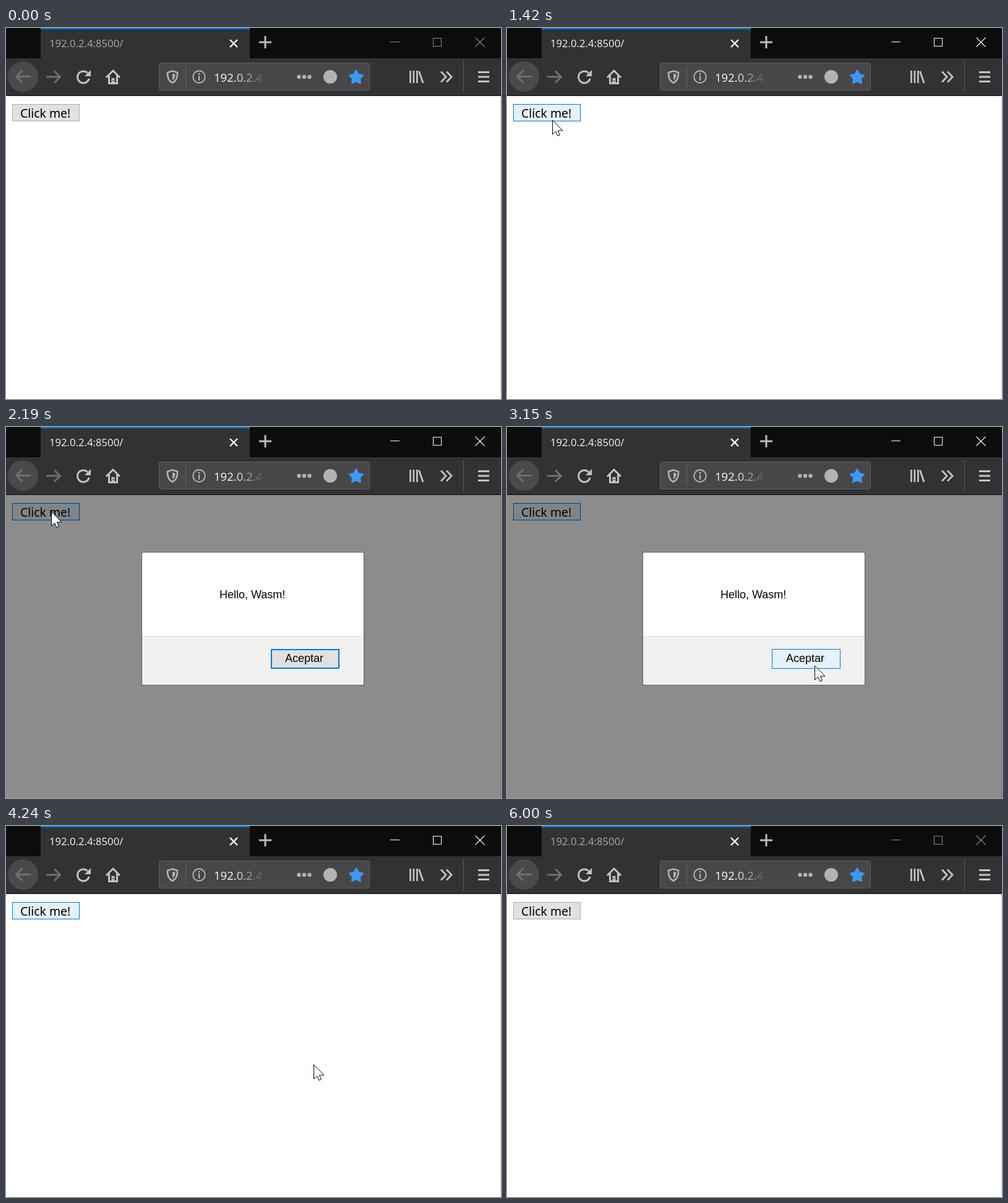
Animation, 800 px wide and 600 px high, one loop 6.07 s. Source, as an HTML page with a canvas:

```html
<!DOCTYPE html>
<html lang="en">
<head>
<meta charset="utf-8">
<title>Button demo</title>
<style>
  html, body { margin: 0; width: 100%; height: 100%; overflow: hidden; background: #fff; }
  canvas { display: block; width: 800px; height: 600px; }
</style>
</head>
<body>
<canvas id="stage" width="800" height="600"></canvas>
<script>
const ctx = document.getElementById('stage').getContext('2d');
const LOOP = 6070;
const ADDRESS = '192.0.2.4:8500/';
const UI_FONT = '"Open Sans", "Noto Sans", sans-serif';
const DIALOG_FONT = '18px "Liberation Sans", Arial, sans-serif';
const ICON = '#c4c4c5', FIELD_ICON = '#b3b3b5', FAINT = '#736d6b';

const easeOut = u => 1 - (1 - u) ** 2;
const easeIn = u => u ** 1.6;
const easeBoth = u => u * u * (3 - 2 * u);

// Pointer moves in discrete steps, the first one at `start`, the last at `end`.
const MOVES = [
  { start: 80, end: 560, steps: 11, from: [703, 668], to: [71, 193], ease: easeOut },
  { start: 1140, end: 1550, steps: 10, from: [71, 193], to: [73, 136], ease: easeBoth },
  { start: 2490, end: 3060, steps: 12, from: [73, 136], to: [483, 368], ease: easeBoth },
  { start: 3110, end: 3150, steps: 2, from: [483, 368], to: [497, 385], ease: u => u },
  { start: 4440, end: 4690, steps: 6, from: [497, 385], to: [507, 610], ease: easeIn }
];
const PRESSES = [[1000, 1140], [2090, 2190], [4150, 4240]];

const PAGE_BUTTON = { x: 10, y: 123, w: 109, h: 28 };
const OK_BUTTON = { x: 428, y: 359, w: 111, h: 32 };
const LOOKS = {
  normal: ['#e1e1e1', '#adadad', 1],
  focus: ['#e1e1e1', '#0078d7', 2],
  hover: ['#e5f1fb', '#0078d7', 1],
  press: ['#cce4f7', '#005499', 1]
};

const within = (t, [a, b]) => t >= a && t < b;
const inside = (p, r) => p && p[0] >= r.x && p[0] < r.x + r.w && p[1] >= r.y && p[1] < r.y + r.h;

function pointerAt(t) {
  const move = MOVES.filter(m => t >= m.start).pop();
  if (!move) return null;
  const { start, end, steps, from, to, ease } = move;
  const step = Math.min(steps, 1 + Math.floor((t - start) / (end - start) * (steps - 1) + 1e-6));
  const p = ease(step / steps);
  return from.map((v, i) => Math.round(v + (to[i] - v) * p));
}

function rect(x, y, w, h, fill) {
  ctx.fillStyle = fill;
  ctx.fillRect(x, y, w, h);
}

function trace(points, closed) {
  ctx.beginPath();
  points.forEach(([x, y]) => ctx.lineTo(x, y));
  if (closed) ctx.closePath();
}

function line(color, width, ...points) {
  trace(points);
  ctx.strokeStyle = color;
  ctx.lineWidth = width;
  ctx.stroke();
}

function disc(x, y, r, fill) {
  ctx.beginPath();
  ctx.arc(x, y, r, 0, Math.PI * 2);
  ctx.fillStyle = fill;
  ctx.fill();
}

function ring(x, y, r, color, width, a = 0, b = Math.PI * 2) {
  ctx.beginPath();
  ctx.arc(x, y, r, a, b);
  ctx.strokeStyle = color;
  ctx.lineWidth = width;
  ctx.stroke();
}

function text(str, x, y, font, fill) {
  ctx.font = font;
  ctx.fillStyle = fill;
  ctx.fillText(str, x, y);
}

function drawTitleBar(active) {
  rect(0, 0, 800, 49, '#0c0c0d');
  rect(56, 0, 338, 49, '#323234');
  rect(56, 0, 338, 2, '#0a7cdf');
  text(ADDRESS, 70, 31, '16.7px ' + UI_FONT, active ? '#f5f5f6' : '#a9a9ab');
  line('#fff', 2.4, [362, 19], [374, 31]);
  line('#fff', 2.4, [374, 19], [362, 31]);
  line('#bdbdbe', 3, [409, 23], [429, 23]);
  line('#bdbdbe', 3, [419, 13], [419, 33]);

  const control = active ? '#fff' : '#8b8b8b';
  rect(621, 22, 15, 1, control);
  ctx.strokeStyle = control;
  ctx.lineWidth = 1;
  ctx.strokeRect(690.5, 16.5, 13, 13);
  line(control, 1.1, [758.5, 15.5], [773.5, 30.5]);
  line(control, 1.1, [773.5, 15.5], [758.5, 30.5]);
}

function drawNavigation() {
  disc(27.5, 78.5, 24.5, '#4a4a4c');
  line(FAINT, 3, [17, 78.5], [40, 78.5]);
  line(FAINT, 3, [26.5, 68.5], [16.5, 78.5], [26.5, 88.5]);
  line(FAINT, 3, [65, 79], [87, 79]);
  line(FAINT, 3, [78, 69.5], [87.5, 79], [78, 88.5]);

  ring(125, 79.5, 9.5, ICON, 3, 0.25, 5.5);
  trace([[137, 68], [137, 78], [127, 78]], true);
  ctx.fillStyle = ICON;
  ctx.fill();

  line(ICON, 3, [162, 80], [173, 69], [184, 80]);
  line(ICON, 3, [166.5, 77], [166.5, 89.5], [179.5, 89.5], [179.5, 77]);
  rect(170.5, 81, 5, 9, ICON);
  rect(172.5, 84, 1.5, 2, '#323234');
}

function drawShield() {
  ctx.beginPath();
  ctx.moveTo(269, 69.5);
  ctx.lineTo(277, 72);
  ctx.bezierCurveTo(277.5, 81, 275, 86, 269, 88.7);
  ctx.bezierCurveTo(263, 86, 260.5, 81, 261, 72);
  ctx.closePath();
  ctx.strokeStyle = FIELD_ICON;
  ctx.lineWidth = 2.6;
  ctx.stroke();
  ctx.beginPath();
  ctx.moveTo(269, 73.5);
  ctx.lineTo(273.5, 75);
  ctx.quadraticCurveTo(273.5, 82, 269, 84.5);
  ctx.fillStyle = FIELD_ICON;
  ctx.fill();
}

function drawStar(x, y, r) {
  const points = Array.from({ length: 10 }, (_, i) => {
    const a = i * Math.PI / 5 - Math.PI / 2, d = i % 2 ? r * 0.54 : r;
    return [x + d * Math.cos(a), y + d * Math.sin(a)];
  });
  trace(points, true);
  ctx.fillStyle = ctx.strokeStyle = '#3f97f4';
  ctx.lineWidth = 2;
  ctx.lineJoin = 'round';
  ctx.fill();
  ctx.stroke();
  ctx.lineJoin = 'miter';
}

function drawAddressField() {
  ctx.beginPath();
  ctx.roundRect(247.5, 56.5, 340, 44, 3);
  ctx.fillStyle = '#474749';
  ctx.fill();
  ctx.strokeStyle = '#606062';
  ctx.lineWidth = 1;
  ctx.stroke();
  drawShield();
  rect(290, 62, 1, 33, '#666668');

  ring(312, 79, 9.7, FIELD_ICON, 1.9);
  rect(311, 77, 2.2, 8, FIELD_ICON);
  disc(312, 74, 1.5, FIELD_ICON);

  const fade = ctx.createLinearGradient(370, 0, 419, 0);
  fade.addColorStop(0, '#f9f9fa');
  fade.addColorStop(1, 'rgba(249,249,250,0)');
  text(ADDRESS.split(':')[0], 336, 86.5, '18.5px ' + UI_FONT, fade);

  for (const x of [473.5, 482, 490.5]) disc(x, 79, 3.2, FIELD_ICON);
  disc(524, 79, 11, FIELD_ICON);
  drawStar(566, 80, 11.7);
}

function drawToolbar() {
  rect(0, 49, 800, 60, '#323234');
  rect(0, 109, 800, 1, '#0c0c0d');
  drawNavigation();
  drawAddressField();
  for (const x of [652, 657.5, 663]) rect(x, 69, 2.7, 20, ICON);
  line(ICON, 2.8, [667.5, 70], [674, 89]);
  for (const x of [703, 712]) line(ICON, 2.8, [x, 70.5], [x + 8, 79], [x, 87.5]);
  rect(739, 53, 1, 51, '#5a5a5c');
  for (const y of [70, 77.5, 85]) rect(763, y, 18, 3, ICON);
}

function drawButton({ x, y, w, h }, look) {
  const [fill, border, width] = LOOKS[look];
  rect(x, y, w, h, border);
  rect(x + width, y + width, w - 2 * width, h - 2 * width, fill);
}

function drawPage(look) {
  rect(0, 110, 800, 490, '#fff');
  rect(799, 110, 1, 490, '#cbcbcb');
  drawButton(PAGE_BUTTON, look);
  text('Click me!', look === 'press' ? 24 : 23, 145, '19.4px "Noto Sans", "Open Sans", sans-serif', '#000');
}

function drawDialog(look) {
  rect(0, 110, 800, 490, 'rgba(0,0,0,.45)');
  ctx.beginPath();
  ctx.roundRect(219, 202, 360, 216, 3);
  ctx.fillStyle = '#5c5c5c';
  ctx.fill();
  ctx.beginPath();
  ctx.roundRect(220, 203, 358, 214, 2);
  ctx.fillStyle = '#f1f1f0';
  ctx.fill();
  rect(220, 204, 358, 134, '#fff');
  rect(221, 203, 356, 1, '#fff');
  rect(220, 338, 358, 1, '#dfdfdf');
  text('Hello, Wasm!', 345, 277, DIALOG_FONT, '#000');
  drawButton(OK_BUTTON, look);
  text('Aceptar', look === 'press' ? 452 : 451, 380, DIALOG_FONT, '#000');
}

function drawPointer([x, y]) {
  ctx.save();
  ctx.translate(x, y);
  trace([[.5, 1], [.5, 24], [5.7, 19.3], [9, 26.4], [12.4, 24.9], [9.5, 18], [17, 17.8]], true);
  ctx.fillStyle = '#fff';
  ctx.fill();
  ctx.strokeStyle = '#000';
  ctx.lineWidth = 1;
  ctx.lineJoin = 'round';
  ctx.stroke();
  ctx.restore();
}

function draw(t) {
  const pointer = pointerAt(t);
  const pressed = PRESSES.some(span => within(t, span));
  const active = within(t, [1000, 6000]);
  const dialogOpen = within(t, [2190, 4240]);

  let pageLook = 'normal';
  if (within(t, [2190, 4440])) pageLook = 'hover';
  else if (within(t, [4440, 6000])) pageLook = 'focus';
  else if (inside(pointer, PAGE_BUTTON)) pageLook = pressed ? 'press' : 'hover';

  drawTitleBar(active);
  drawToolbar();
  drawPage(pageLook);
  if (dialogOpen) {
    const over = inside(pointer, OK_BUTTON);
    drawDialog(!over ? 'focus' : pressed ? 'press' : 'hover');
  }
  if (pointer) drawPointer(pointer);
  if (pressed) disc(pointer[0], pointer[1] - (t < 2000 ? 0 : 1), 18, 'rgba(255,255,0,.5)');
}

const origin = performance.now();
function tick() {
  draw((performance.now() - origin) % LOOP);
  requestAnimationFrame(tick);
}
tick();
</script>
</body>
</html>
```
